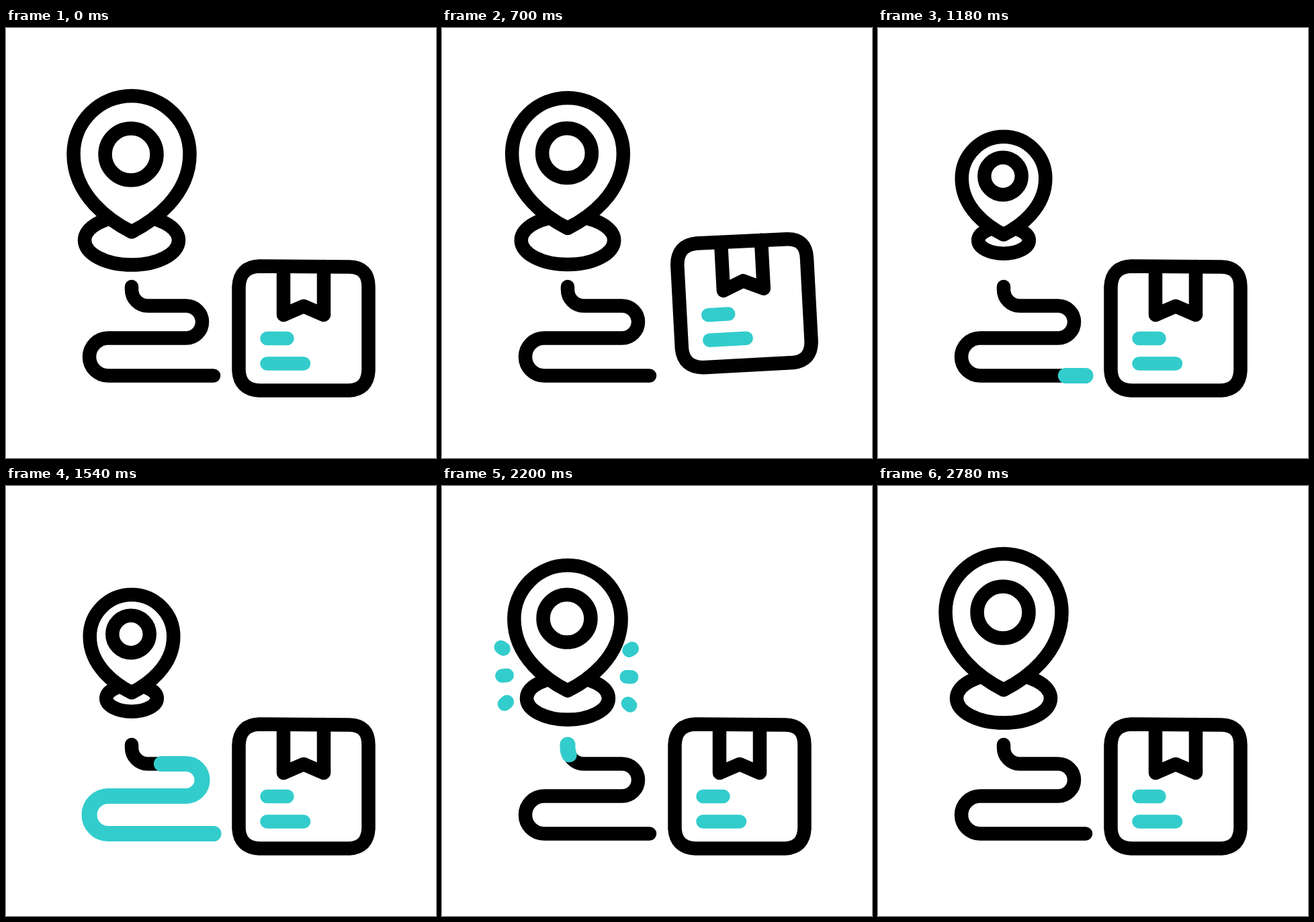
Animation, 640 px wide and 640 px high, one loop 2.94 s. Source, as an HTML page with a canvas:

```html
<!DOCTYPE html>
<html lang="en">
<head>
<meta charset="utf-8">
<title>Parcel delivery</title>
<style>
  html, body { margin: 0; width: 100%; height: 100%; overflow: hidden; background: #fff; }
  canvas { display: block; width: 640px; height: 640px; }
</style>
</head>
<body>
<canvas id="stage" width="640" height="640"></canvas>
<script>
const ctx = document.getElementById('stage').getContext('2d');
const LOOP = 2940, STEP = 20;
const BLACK = '#000', TEAL = '#33cccc', WHITE = '#fff';

// Eased value between [time, value] keys, held outside them.
function keyed(t, keys) {
  if (t <= keys[0][0]) return keys[0][1];
  for (let i = 1; i < keys.length; i++) {
    const [t0, a] = keys[i - 1], [t1, b] = keys[i];
    if (t <= t1) {
      const u = (t - t0) / (t1 - t0);
      return a + (b - a) * u * u * (3 - 2 * u);
    }
  }
  return keys[keys.length - 1][1];
}

// The pin swells, shrinks while the line travels, then grows back.
const pinKeys = (rest, peak, small) =>
  [[370, rest], [530, peak], [990, small], [1940, small], [2340, rest]];
const PIN = {
  scale: pinKeys(1, 1.064, 0.72),
  tip: pinKeys(303.5, 293.8, 307.5),
  eye: pinKeys(115.5, 122.9, 87),
  base: pinKeys(1, 1.19, 0.54)
};
const BOX = {
  lift: [[200, 0], [570, -37.5], [800, -37.5], [1120, 0]],
  angle: [[460, 0], [670, -3.3], [930, 3.3], [1120, 0]]
};
const TRAIL = { head: [[1100, 0], [1660, 1]], tail: [[1680, 0], [2260, 1]] };
const RAY = { head: [[2100, 0], [2520, 1]], tail: [[2283, 0], [2703, 1]] };

// Route from the box to the pin.
const route = new Path2D(
  'M309 517.5 H152 A28 28 0 0 1 152 461.5 H268 A24 24 0 0 0 268 413.5 H211 A24 24 0 0 1 187 389.5 V385');
const ROUTE_LENGTH = 157 + 116 + 57 + 4.5 + Math.PI * (28 + 24 + 12);

const boxFrame = new Path2D(
  'M377 354.5 L511 355.5 Q539.5 356 539.5 385 V510 Q538 538 511 539.5 H377 Q348 538 346.5 510 V385 Q348 355.5 377 354.5 Z');
const ribbon = new Path2D('M413 355 V427 L443 414 L473 427 V355');
const label = new Path2D('M388.5 462 H418.5 M388.5 499.5 H443');

// Inner and outer ends of each ray, part way through its growth.
const rays = [
  [84, 283, 53, 286], [85, 238, 69, 227], [90, 327, 73, 341],
  [287.5, 284.5, 318.5, 285.5], [286, 240, 304, 228.5], [282.5, 329, 296, 342]
];

function stroke(path, color, width = 20.5) {
  ctx.strokeStyle = color;
  ctx.lineWidth = width;
  ctx.stroke(path);
}

function drawRoute(t) {
  stroke(route, BLACK);
  const head = keyed(t, TRAIL.head) * ROUTE_LENGTH;
  const tail = keyed(t, TRAIL.tail) * ROUTE_LENGTH;
  if (head <= tail) return;
  ctx.setLineDash([head - tail, 2 * ROUTE_LENGTH]);
  ctx.lineDashOffset = -tail;
  stroke(route, TEAL, 23);
  ctx.setLineDash([]);
}

function drawBox(t) {
  const pivot = { x: 443, y: 317 };
  ctx.save();
  ctx.translate(pivot.x, pivot.y + keyed(t, BOX.lift));
  ctx.rotate(keyed(t, BOX.angle) * Math.PI / 180);
  ctx.translate(-pivot.x, -pivot.y);
  stroke(boxFrame, BLACK);
  stroke(ribbon, BLACK);
  stroke(label, TEAL);
  ctx.restore();
}

function drawPin(t) {
  const s = keyed(t, PIN.scale), base = keyed(t, PIN.base);
  const ground = new Path2D();
  ground.ellipse(187, 316, 70 * base, 36.5 * base, 0, 0, 2 * Math.PI);
  stroke(ground, BLACK);

  const shaking = t > 2360 && t < 2760;
  const angle = shaking ? 3.2 * Math.sin((t - 2360) / 200 * 2 * Math.PI) : 0;
  const r = 86.5 * s, mid = -116 * s;
  const drop = new Path2D();
  drop.moveTo(0, 0);
  drop.bezierCurveTo(-31 * s, -15.5 * s, -r, -53.5 * s, -r, mid);
  drop.arc(0, mid, r, Math.PI, 2 * Math.PI);
  drop.bezierCurveTo(r, -53.5 * s, 31 * s, -15.5 * s, 0, 0);
  drop.closePath();
  const eye = new Path2D();
  eye.arc(-1, -keyed(t, PIN.eye), 38.5 * s, 0, 2 * Math.PI);

  ctx.save();
  ctx.translate(187, keyed(t, PIN.tip));
  ctx.rotate(angle * Math.PI / 180);
  ctx.fillStyle = WHITE;
  ctx.fill(drop);
  stroke(drop, BLACK);
  stroke(eye, BLACK);
  ctx.restore();
}

function drawRays(t) {
  const head = keyed(t, RAY.head), tail = keyed(t, RAY.tail);
  if (head <= tail) return;
  const burst = new Path2D();
  for (const [x0, y0, x1, y1] of rays) {
    const at = k => {
      const u = (k - 0.25) / 0.61;
      return [x0 + (x1 - x0) * u, y0 + (y1 - y0) * u];
    };
    burst.moveTo(...at(tail));
    burst.lineTo(...at(head));
  }
  stroke(burst, TEAL);
}

function frame(now) {
  const t = Math.floor((now % LOOP) / STEP) * STEP;
  ctx.fillStyle = WHITE;
  ctx.fillRect(0, 0, 640, 640);
  ctx.lineCap = ctx.lineJoin = 'round';
  drawRoute(t);
  drawBox(t);
  drawPin(t);
  drawRays(t);
}

const start = performance.now();
function tick() {
  frame(performance.now() - start);
  requestAnimationFrame(tick);
}
tick();
</script>
</body>
</html>
```
